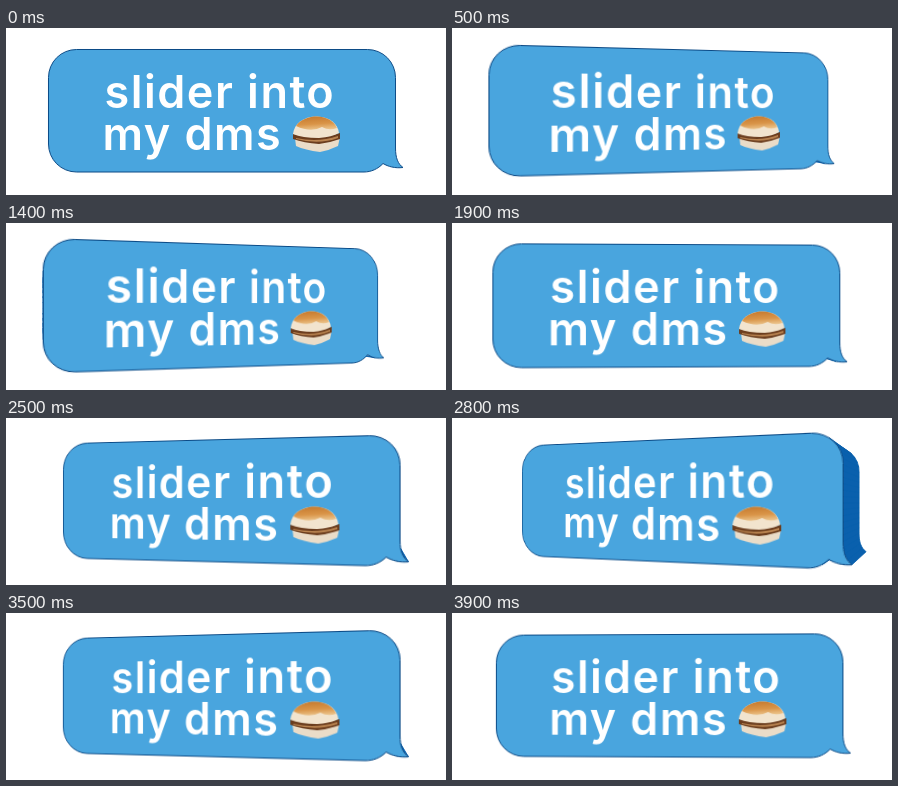
An HTML page that plays this animation: 440 px wide and 167 px high, repeating every 4000 ms.

```html
<!DOCTYPE html>
<html lang="en">
<head>
<meta charset="utf-8">
<title>Turning message bubble</title>
<style>
  html, body { margin: 0; width: 100%; height: 100%; overflow: hidden; background: #fff; }
  #stage { position: relative; width: 440px; height: 167px; overflow: hidden;
    perspective: 590px; perspective-origin: 220px 83.5px; }
  svg { position: absolute; left: 0; top: 0; width: 440px; height: 167px; }
  #face { transform-origin: 220px 83.5px; }
  text { font: 600 45px Inter, "Open Sans", sans-serif; letter-spacing: 1.5px; fill: #fff; }
</style>
</head>
<body>
<div id="stage">
  <svg viewBox="0 0 440 167">
    <path id="walls" fill="#0a60ad" stroke="#0a60ad" stroke-width=".8" stroke-linejoin="round"/>
  </svg>
  <svg id="face" viewBox="0 0 440 167">
    <defs>
      <linearGradient id="crust" x1=".4" y1="0" x2=".6" y2="1">
        <stop offset="0" stop-color="#c67b30"/>
        <stop offset=".55" stop-color="#d99447"/>
        <stop offset="1" stop-color="#ecc68f"/>
      </linearGradient>
    </defs>
    <path id="bubble" fill="#49a5de" stroke="#0b4a86" stroke-width="1"
      d="M70.5 21.5H361.5A28 28 0 0 1 389.5 49.5V120C389.5 130 392 136 397 139.5
         C389 140.5 382 138.5 377 135.5C372 141 365 144 358 144H70.5
         A28 28 0 0 1 42.5 116V49.5A28 28 0 0 1 70.5 21.5Z"/>
    <text x="98.5" y="80">slider into</text>
    <text x="96.5" y="122">my dms</text>
    <g id="burger">
      <path fill="#eadcc8" d="M289 110L334 109L332 118Q324 122 314 124Q299 122 290 118Z"/>
      <path fill="#6b3d1e" d="M287 106Q312 113 334 105V111Q323 115 313 116Q298 115 287 111Z"/>
      <path fill="#b98350" d="M290 110Q312 115 332 108V110Q313 117 290 111Z"/>
      <path fill="#f2e4ce" d="M287 106C288 96 297 88.5 311 88.5C324 89 332 96 333 105Q326 109 313 110Q296 110 287 106Z"/>
      <path fill="url(#crust)" d="M290 98C295 91 303 88.5 311 88.5C321 89 328 93 331 100Q323 103 316 99Q305 105 290 98Z"/>
    </g>
  </svg>
</div>
<script>
const LOOP = 4000, CAMERA = 590, FRONT = 10, DEPTH = 147, CX = 220, CY = 83.5;
const face = document.getElementById('face');
const walls = document.getElementById('walls');
const bubble = document.getElementById('bubble');

const STEPS = 160;
const length = bubble.getTotalLength();
const outline = Array.from({ length: STEPS }, (_, i) => bubble.getPointAtLength(length * i / STEPS));

// Nearly constant speed, with soft turns at both ends.
function angleAt(ms) {
  const phase = 2 * Math.PI * ms / LOOP;
  return (22.4 * Math.sin(phase) - 2.6 * Math.sin(3 * phase)) * Math.PI / 180;
}

function project(point, z, angle) {
  const x = point.x - CX, sin = Math.sin(angle), cos = Math.cos(angle);
  const scale = CAMERA / (CAMERA + FRONT + x * sin - z * cos);
  return [CX + (x * cos + z * sin) * scale, CY + (point.y - CY) * scale];
}

// Side walls that face the viewer, one quad per outline step.
function wallPath(angle) {
  const front = outline.map(p => project(p, FRONT, angle));
  const back = outline.map(p => project(p, FRONT - DEPTH, angle));
  let d = '';
  for (let i = 0; i < STEPS; i++) {
    const j = (i + 1) % STEPS;
    const [a, b, c, e] = [front[i], back[i], back[j], front[j]];
    const turn = (c[0] - a[0]) * (e[1] - b[1]) - (c[1] - a[1]) * (e[0] - b[0]);
    if (turn > 0) d += `M${a}L${b}L${c}L${e}Z`;
  }
  return d;
}

function draw(now) {
  const angle = angleAt(now % LOOP);
  face.style.transform = `translateZ(${-FRONT}px) rotateY(${angle}rad) translateZ(${FRONT}px)`;
  walls.setAttribute('d', wallPath(angle));
  requestAnimationFrame(draw);
}
requestAnimationFrame(draw);
</script>
</body>
</html>
```
